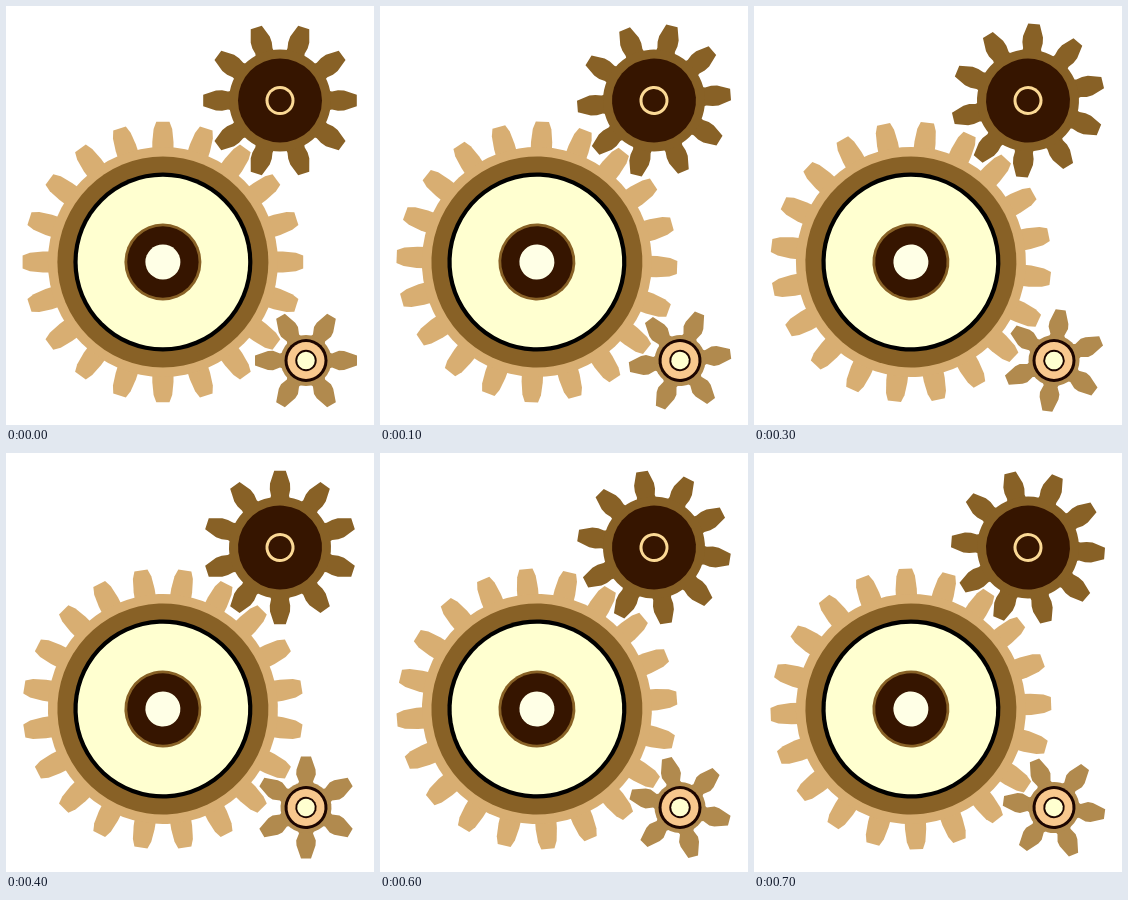
Animation of 368 by 419 pixels, one loop 800 ms. Source, as an HTML page with a canvas:

```html
<!DOCTYPE html>
<html lang="en">
<head>
<meta charset="utf-8">
<title>Gears</title>
<style>
html, body { margin: 0; width: 100%; height: 100%; overflow: hidden; background: #fff; }
canvas { display: block; }
</style>
</head>
<body>
<canvas id="stage" width="368" height="419"></canvas>
<script>
const ctx = document.getElementById('stage').getContext('2d');
const LOOP = 800, STEPS = 8;
const DARK = '#361500', BROWN = '#886126', CREAM = '#ffffd0';

// tooth: [radius, half width] pairs from root to tip; discs: [radius, colour]
const gears = [
  { x: 274, y: 94.5, teeth: 10, dir: -1, color: BROWN, body: 51,
    tooth: [[47, 10], [52, 9], [58, 10.2], [64, 10], [76.8, 5.8]],
    discs: [[42, DARK], [14.5, '#fbd995'], [11.5, DARK]] },
  { x: 156.9, y: 256, teeth: 20, dir: 1, color: '#d8ae72', body: 115,
    tooth: [[110, 10.6], [120, 10.6], [133, 9.3], [140.3, 6.6]],
    discs: [[105.5, BROWN], [89.5, '#000'], [85.3, CREAM],
            [38.5, BROWN], [35.7, DARK], [17.5, '#ffffe6']] },
  { x: 300, y: 354.5, teeth: 6, dir: -1, color: '#b18a4e', body: 25.5,
    tooth: [[21, 9], [26, 7], [33, 9.8], [38, 9.5], [51, 5]],
    discs: [[21.5, '#1c0500'], [18.5, '#f8c88e'], [10.7, '#1c0500'], [8.8, CREAM]] }
];

function disc(radius, color) {
  ctx.fillStyle = color;
  ctx.beginPath();
  ctx.arc(0, 0, radius, 0, Math.PI * 2);
  ctx.fill();
}

function drawGear(gear, progress) {
  const pitch = Math.PI * 2 / gear.teeth;
  ctx.save();
  ctx.translate(gear.x, gear.y);
  ctx.rotate(gear.dir * progress * pitch);
  ctx.fillStyle = gear.color;
  for (let i = 0; i < gear.teeth; i++) {
    ctx.beginPath();
    for (const [r, w] of gear.tooth) ctx.lineTo(r, -w);
    for (const [r, w] of [...gear.tooth].reverse()) ctx.lineTo(r, w);
    ctx.fill();
    ctx.rotate(pitch);
  }
  disc(gear.body, gear.color);
  for (const [r, color] of gear.discs) disc(r, color);
  ctx.restore();
}

function render(now) {
  const progress = Math.floor(now % LOOP / LOOP * STEPS) / STEPS;
  ctx.fillStyle = '#fff';
  ctx.fillRect(0, 0, 368, 419);
  for (const gear of gears) drawGear(gear, progress);
}

let start;
function tick(now) {
  start ??= now;
  render(now - start);
  requestAnimationFrame(tick);
}
render(0);
requestAnimationFrame(tick);
</script>
</body>
</html>
```
